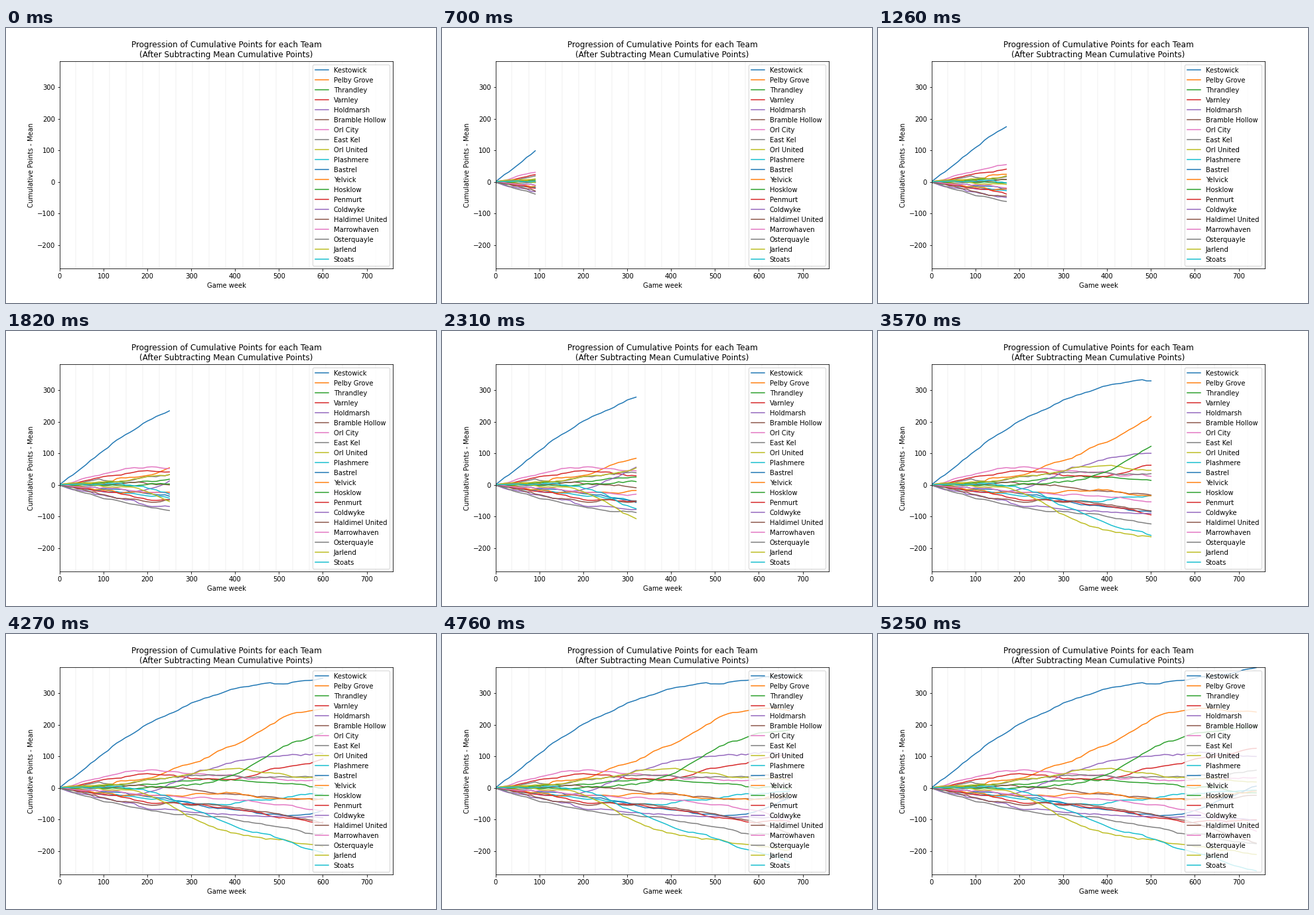
Animation of 648x414 px, one loop 5.32 s. Source, as a matplotlib script:

```python
import numpy as np
import matplotlib.pyplot as plt
from matplotlib.animation import FuncAnimation

STEP = 10
LAST = 740
KNOTS = np.array([0, 180, 370, 560, LAST])
weeks = np.arange(0, LAST + 1, STEP)
rng = np.random.default_rng(19)

plt.rcParams["font.family"] = "DejaVu Sans"
plt.rcParams["font.size"] = 10

fig, ax = plt.subplots(figsize=(9, 5.75), dpi=72)
fig.subplots_adjust(left=0.125, right=0.9, bottom=0.125, top=0.88)
ax.set_xlim(0, 760)
ax.set_ylim(-274, 382.6)
ax.set_title("Progression of Cumulative Points for each Team\n"
             "(After Subtracting Mean Cumulative Points)")
ax.set_xlabel("Game week")
ax.set_ylabel("Cumulative Points - Mean")

# season boundaries
for x in range(37, 760, 38):
    ax.axvline(x, color="gray", lw=0.12)


def smooth(x, xs, ys):
    """Cubic Hermite curve through the points (xs, ys)."""
    slope = np.gradient(ys, xs)
    i = np.clip(np.searchsorted(xs, x, side="right") - 1, 0, len(xs) - 2)
    h = xs[i + 1] - xs[i]
    t = (x - xs[i]) / h
    ease = t * t * (3 - 2 * t)
    bend = t * (1 - t) * ((1 - t) * slope[i] - t * slope[i + 1])
    return ys[i] + (ys[i + 1] - ys[i]) * ease + h * bend


def form():
    """Short winning and losing runs around the trend."""
    runs = np.convolve(rng.normal(0, 5, len(weeks)), np.ones(4) / 4, "same")
    return runs * np.minimum(weeks / 30, 1)


teams = []


def team(name, *points):
    start = rng.choice([-1.4, 1.6])
    trend = smooth(weeks, KNOTS, np.array([start, *points]))
    line, = ax.plot([], [], label=name)
    teams.append((line, trend + form()))


# values after about five, ten, fifteen and twenty seasons
team("Kestowick", 185, 304, 338, 375)
team("Pelby Grove", 26, 118, 245, 238)
team("Thrandley", 10, 26, 8, -15)
team("Varnley", 42, 27, 80, 125)
team("Holdmarsh", -20, 72, 107, 100)
team("Bramble Hollow", 5, -16, -36, -25)
team("Orl City", 56, 38, 24, 35)
team("East Kel", 23, 40, 35, 55)
team("Orl United", 20, 60, 35, 20)
team("Plashmere", -30, -50, -20, -5)
team("Bastrel", -22, -64, -78, 2)
team("Yelvick", -25, -18, -35, -12)
team("Hosklow", 0, 28, 160, 195)
team("Penmurt", -40, -60, -102, -98)
team("Coldwyke", -58, -84, -92, -98)
team("Haldimel United", -48, -58, -100, -175)
team("Marrowhaven", -20, -36, -66, -140)
team("Osterquayle", -67, -89, -138, -178)
team("Jarlend", -15, -135, -172, -212)
team("Stoats", -5, -106, -186, -262)

ax.legend(loc="upper right")


def update(tick):
    n = max(tick, 1)
    for line, values in teams:
        line.set_data(weeks[:n], values[:n])
    return [line for line, _ in teams]


anim = FuncAnimation(fig, update, frames=76, interval=70, repeat=True)
plt.show()
```
